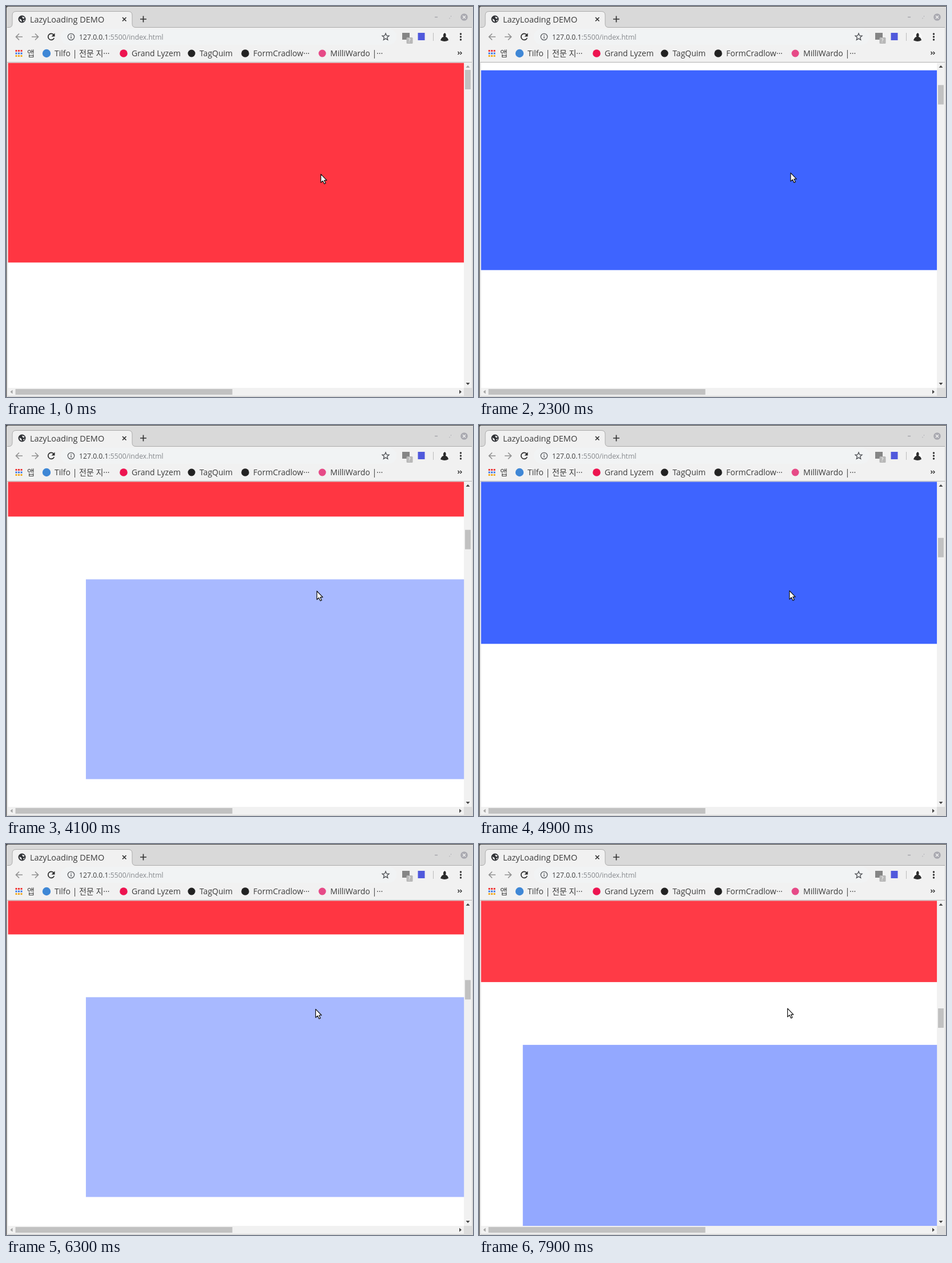
These frames come from a looping animation (818 by 685 pixels, 8000 ms). An HTML page:

```html
<!DOCTYPE html>
<html lang="ko">
<head>
<meta charset="utf-8">
<title>LazyLoading DEMO</title>
<style>
  html, body { margin: 0; width: 100%; height: 100%; overflow: hidden; background: #d9d9d9; }
  svg { display: block; }
  text { font: 14px "Open Sans", "Noto Sans CJK KR", "Noto Sans CJK", sans-serif; fill: #3c3c3c; white-space: pre; }
  .title { font-size: 14.5px; }
  .address { font-size: 12.2px; }
  .badge { font-size: 9px; fill: #fff; }
  .line { fill: none; stroke-width: 1.7; }
  .crisp { shape-rendering: crispEdges; }
</style>
</head>
<body>
<svg id="stage" width="818" height="685" viewBox="0 0 818 685">
  <!-- window and tab -->
  <rect width="818" height="685" fill="#444"/>
  <rect x="1" y="1" width="820" height="690" rx="3" fill="#d9d9d9"/>
  <path d="M2 37.5H5Q11 37.5 11 31V16Q11 9.5 18 9.5H214Q221 9.5 221 16V31Q221 37.5 227 37.5H816V98H2Z" fill="#f1f1f1"/>
  <path d="M2 37.5H5Q11 37.5 11 31V16Q11 9.5 18 9.5H214Q221 9.5 221 16V31Q221 37.5 227 37.5H816" fill="none" stroke="#acacac"/>
  <circle cx="28" cy="23" r="6.5" fill="#303236"/>
  <path d="M23.5 22L27 24L28 28L24.5 26ZM28 18.5L32.5 20L31.5 22.5L29 21.5ZM30 25L33 24L31 27.5Z" fill="#eee"/>
  <text class="title" x="42" y="29">LazyLoading DEMO</text>
  <path class="line" d="M204 20L210.5 26.5M210.5 20L204 26.5M235 23H246M240.5 17.5V28.5" stroke="#333"/>
  <path d="M751 19.5H756M776.5 21.5H777.5M779 18H780" stroke="#a6a6ac" stroke-width="1.5"/>
  <circle cx="802.5" cy="19.5" r="6.3" fill="#a9a9b0"/>
  <path d="M800 17L805 22M805 17L800 22" stroke="#eee" stroke-width="1.5"/>

  <!-- toolbar -->
  <rect x="96" y="40" width="588" height="28" rx="14" fill="#f1f3f4"/>
  <path class="line" d="M29 54H17.5M23 48.5L17.5 54L23 59.5M45 54H56.5M51 48.5L56.5 54L51 59.5" stroke="#929292"/>
  <path class="line" d="M83.5 50.5A5.5 5.5 0 1 0 84.3 56" stroke="#2b2b2b"/>
  <path d="M85.5 47.5V53.5H79.5Z" fill="#2b2b2b"/>
  <circle cx="114" cy="54" r="5.7" fill="none" stroke="#5a5d61" stroke-width="1.3"/>
  <path d="M114 53V57M114 50.5V52" stroke="#5a5d61" stroke-width="1.4"/>
  <text class="address" x="128" y="58.5">127.0.0.1<tspan fill="#85888c">:5500/index.html</tspan></text>
  <path d="M665 48L666.7 52L671 52.3L667.7 55.1L668.7 59.4L665 57.1L661.3 59.4L662.3 55.1L659 52.3L663.3 52Z" fill="none" stroke="#4c4f53" stroke-width="1.3"/>
  <rect x="694" y="47" width="13" height="12" fill="#858585"/>
  <rect x="701.5" y="55" width="11" height="11" rx="1.5" fill="#b8b8b8"/>
  <text class="badge" x="704.5" y="64">?</text>
  <rect x="721.5" y="47" width="12" height="13" fill="#5059dc"/>
  <path d="M748.5 47V61" stroke="#bbb"/>
  <circle cx="768" cy="54" r="8" fill="#fafafa"/>
  <path d="M761 60Q763 54 766.5 54Q764.5 49 768.5 47Q772 49 770 54Q774 55 775 60Q768 64 761 60Z" fill="#2c2c2c"/>
  <path d="M796.5 49V60" stroke="#333" stroke-width="3.4" stroke-linecap="round" stroke-dasharray="0 5"/>

  <!-- bookmarks -->
  <g stroke-width="3" stroke-dasharray="3 1.5">
    <path d="M16.5 78.5H28.5" stroke="#e33"/>
    <path d="M16.5 83H28.5" stroke="#3b78e7"/>
    <path d="M16.5 87.5H28.5" stroke="#f0a81d"/>
  </g>
  <text x="37" y="88">앱</text>
  <circle cx="71" cy="83" r="7.2" fill="#3f87d6"/>
  <text x="85" y="88">Tilfo | 전문 지···</text>
  <circle cx="206" cy="83" r="6.8" fill="#ed1450"/>
  <text x="220" y="88">Grand Lyzem</text>
  <circle cx="325" cy="83" r="6.5" fill="#222"/>
  <text x="339" y="88">TagQuim</text>
  <circle cx="419" cy="83" r="6.8" fill="#222"/>
  <text x="433" y="88">FormCradlow···</text>
  <circle cx="554" cy="83" r="6.5" fill="#e64a87"/>
  <text x="568" y="88">MilliWardo |···</text>
  <path d="M791.5 80L794 82.5L791.5 85M795.5 80L798 82.5L795.5 85" fill="none" stroke="#333" stroke-width="1.5"/>

  <!-- page and scroll bars -->
  <rect class="crisp" x="2" y="98" width="814" height="1" fill="#b6b6b6"/>
  <rect class="crisp" x="3" y="99" width="813" height="584" fill="#f1f1f1"/>
  <rect class="crisp" x="802" y="669" width="14" height="14" fill="#dcdcdc"/>
  <svg id="page" x="3.4" y="99.4" width="798.8" height="569.6" overflow="hidden">
    <rect width="799" height="570" fill="#fff"/>
  </svg>
  <path id="upArrow" d="M805.5 108H812.5L809 104Z"/>
  <path d="M805.5 660H812.5L809 664ZM794 672.5V679.5L798 676Z" fill="#444"/>
  <path d="M11.5 672.5V679.5L7.5 676Z" fill="#a3a3a3"/>
  <rect id="thumb" x="804" width="10" height="34" fill="#c1c1c1"/>
  <rect x="16.5" y="671" width="380" height="10" fill="#c1c1c1"/>
  <path id="cursor" d="M0 0V14.8L3.4 11.7L6 17L8.4 15.9L5.9 10.7H10.3Z" fill="#fff" stroke="#111" stroke-width="1.2" stroke-linejoin="round"/>
</svg>
<script>
const LOOP = 8000, FRAME = 100;
const PITCH = 460, BLOCK_HEIGHT = 350, SLIDE = 850, FADE = 1000;
const THUMB_TOP = 112, THUMB_RATIO = 0.0593;
const byId = id => document.getElementById(id);
const clamp = x => Math.min(1, Math.max(0, x));

function isStill(frame) {
  if (frame < 42) return frame === 25 || frame === 26;
  return frame < 55 ? frame % 3 === 0 : frame % 4 === 2;
}

function shownTime(time) {
  let frame = Math.floor(time / FRAME);
  while (isStill(frame)) frame--;
  return frame * FRAME;
}

const scrollKeys = [[0, 0], [900, 0], [1600, 228.5], [3000, 665], [4100, 1209], [4900, 1446], [6300, 2131], [7900, 2967.5]];

function scrollAt(time) {
  const next = Math.max(1, scrollKeys.findIndex(([end]) => time <= end));
  const [t0, s0] = scrollKeys[next - 1], [t1, s1] = scrollKeys[next];
  return s0 + (s1 - s0) * (time - t0) / (t1 - t0);
}

// A quick flick to the left, then a slow drift up and left.
function cursorAt(time) {
  const flick = 1 - (1 - clamp((time - 300) / 400)) ** 2;
  const drift = clamp((time - 700) / 7200);
  return [551.5 - 5 * flick - 6 * drift ** 1.5, 294.6 - flick - 5.5 * drift];
}

// CSS "ease": cubic-bezier(.25, .1, .25, 1)
function ease(progress) {
  const x = clamp(progress);
  let low = 0, high = 1, u = 0.5;
  for (let i = 0; i < 20; i++) {
    if (0.75 * u * (1 - u) + u ** 3 < x) low = u; else high = u;
    u = (low + high) / 2;
  }
  return 0.3 * u * (1 - u) ** 2 + 3 * u * u * (1 - u) + u ** 3;
}

function addBlock(revealTime, i) {
  const rect = document.createElementNS("http://www.w3.org/2000/svg", "rect");
  rect.setAttribute("width", 799);
  rect.setAttribute("height", BLOCK_HEIGHT);
  rect.setAttribute("fill", i % 2 ? "#3e64ff" : "#ff3642");
  byId("page").append(rect);
  return { revealTime, rect, top: i * PITCH, side: i % 2 ? 1 : -1 };
}
const blocks = [-FADE, 1180, 2500, 3830, 4890, 6030, 7100, 7577].map(addBlock);

function draw(time) {
  const scroll = scrollAt(time);
  for (const { revealTime, rect, top, side } of blocks) {
    const progress = (time - revealTime) / FADE;
    rect.setAttribute("x", side * SLIDE * (1 - ease(progress * 2)));
    rect.setAttribute("y", top - scroll);
    rect.setAttribute("opacity", ease(progress));
  }
  byId("thumb").setAttribute("y", THUMB_TOP + scroll * THUMB_RATIO);
  byId("upArrow").setAttribute("fill", scroll > 0 ? "#444" : "#a3a3a3");
  byId("cursor").setAttribute("transform", `translate(${cursorAt(time)})`);
}

const begin = performance.now();
function frame() {
  draw(shownTime((performance.now() - begin) % LOOP));
  requestAnimationFrame(frame);
}
frame();
</script>
</body>
</html>
```
